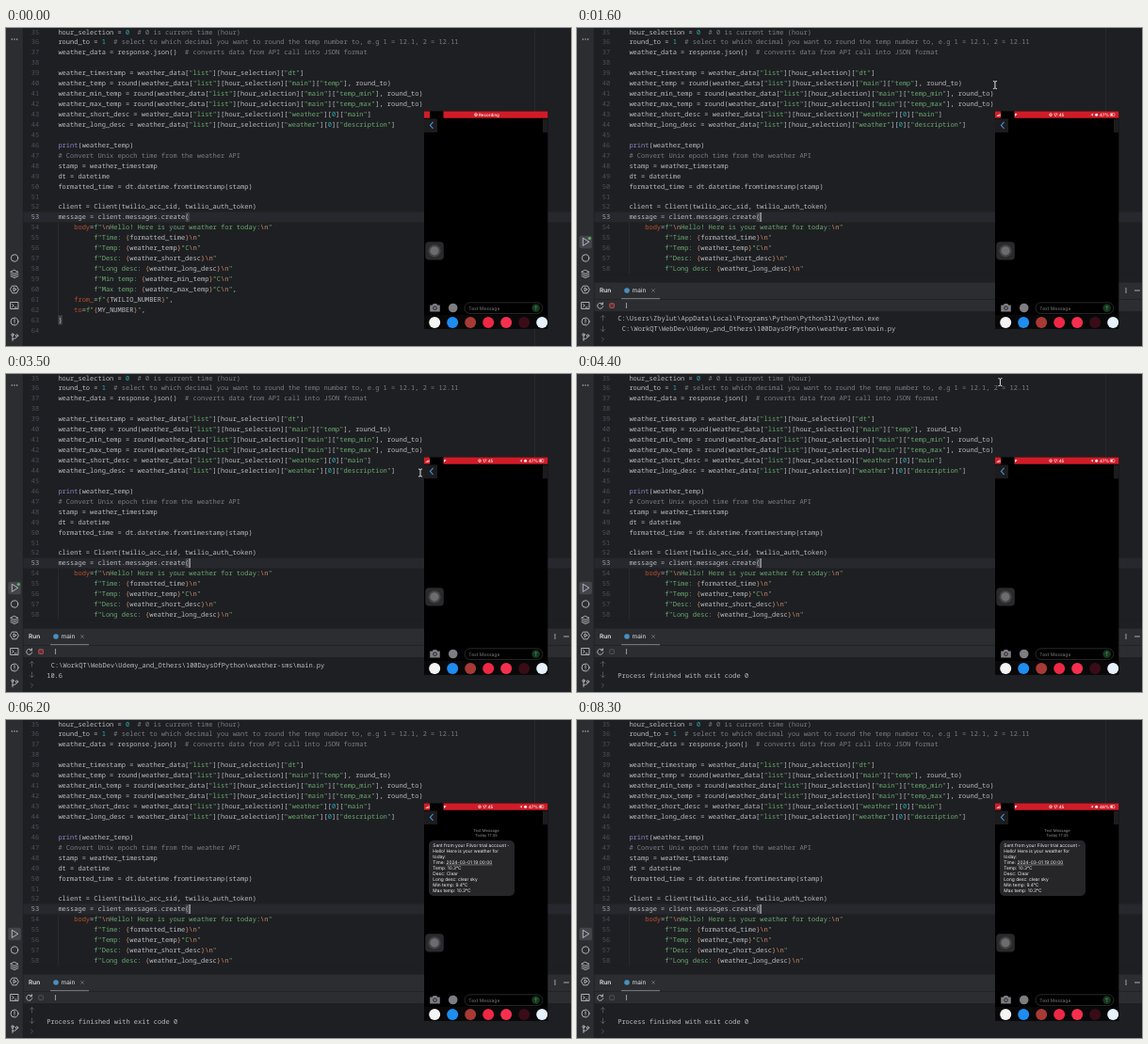
Write an HTML page that moves like this. It is 600 px wide and 338 px high and loops after 8400 ms.

```html
<!DOCTYPE html>
<html lang="en">
<head>
<meta charset="utf-8">
<title>Weather SMS</title>
<style>
  html, body { margin: 0; width: 100%; height: 100%; overflow: hidden; background: #1e1f22; }
  svg { display: block; width: 100%; height: 100%; }
  text { white-space: pre; text-rendering: geometricPrecision; }
  .mono { font: 7.03px "Noto Sans Mono", "DejaVu Sans Mono", monospace; fill: #bcbec4; }
  .ui { font: 6.5px Inter, sans-serif; fill: #dfe1e5; }
  .number { fill: #4b5059; }
  .number.current { fill: #a1a3ab; }
  .comment { fill: #7a7e85; }
  .string { fill: #6aab73; }
  .escape { fill: #cf8e6d; }
  .plain { fill: #bcbec4; }
  .builtin { fill: #8888c6; }
  .argument { fill: #b9532f; }
  .digit { fill: #2aacb8; }
  .icon { fill: none; stroke: #ced0d6; stroke-width: .8; stroke-linejoin: round; stroke-linecap: round; }
  .phone { font: 4.85px Inter, sans-serif; fill: #f2f2f4; }
  .stamp { font-size: 4.2px; fill: #8e8e93; text-anchor: middle; }
  .status { font-size: 4.5px; font-weight: 500; fill: #fff; }
</style>
</head>
<body>
<svg viewBox="0 0 600 338" preserveAspectRatio="none">
  <rect width="600" height="338" fill="#1e1f22"/>
  <rect x="18" y="195.6" width="582" height="10.9" fill="#26282e"/>
  <path d="M561.5 0V338M55.5 207V305" stroke="#2d2f33" stroke-width=".7"/>
  <g fill="#43454a">
    <rect x="190.6" y="196" width="4.3" height="10"/>
    <rect x="55.4" y="305.4" width="4.3" height="10"/>
  </g>
  <g id="editor" class="mono"></g>
  <rect data-span="500,8400" x="194.6" y="196" width="1" height="10" fill="#ced0d6"/>

  <!-- run panel -->
  <g data-span="1500,8400">
    <rect x="18" y="261.5" width="582" height="77" fill="#1e1f22"/>
    <rect x="18" y="270.5" width="582" height="31" fill="#2b2d30"/>
    <path d="M18 288.5H600M18 301.5H600M37.5 302V338" stroke="#1e1f22" stroke-width=".7"/>
    <text class="ui" x="24" y="281.2" style="font-weight:600">Run</text>
    <circle cx="53" cy="279" r="2.8" fill="#4a8fbd"/>
    <text class="ui" x="58.5" y="281.2">main</text>
    <path d="M47 287.6H88" stroke="#6f737a" stroke-width="1.2"/>
    <g class="icon">
      <path d="M79.5 277.5l3 3m0-3l-3 3" stroke="#868a91" stroke-width=".6"/>
      <path d="M27 293.3a3 3 0 1 0 .7 2.5M27.5 291.8v2h-2"/>
      <path d="M592.5 279h5"/>
      <path d="M27.5 311v-5.5m-2 2l2-2l2 2M27.5 317v5.5m-2-2l2 2l2-2M26.5 329l2 2l-2 2" stroke="#6f737a" stroke-width=".6"/>
    </g>
    <g fill="#ced0d6" id="menuDots"></g>
    <rect data-span="0,3900" x="34.8" y="292.8" width="4.6" height="4.6" rx=".6" fill="#5e3036" stroke="#db5c5c" stroke-width=".8"/>
    <rect data-span="3900,8400" x="34.8" y="292.8" width="4.6" height="4.6" rx=".6" fill="none" stroke="#5a5d63" stroke-width=".8"/>
    <g class="mono">
      <g data-span="1500,2500">
        <text x="43.2" y="310.5">C:\Users\Zbylut\AppData\Local\Programs\Python\Python312\python.exe</text>
        <text x="43.6" y="321.6"> C:\WorkQT\WebDev\Udemy_and_Others\100DaysOfPython\weather-sms\main.py</text>
      </g>
      <g data-span="2500,3900">
        <text x="43.6" y="312.3"> C:\WorkQT\WebDev\Udemy_and_Others\100DaysOfPython\weather-sms\main.py</text>
        <text x="43.2" y="323.3">10.6</text>
      </g>
      <text data-span="3900,8400" x="43.2" y="323.3">Process finished with exit code 0</text>
    </g>
  </g>

  <!-- tool window bar -->
  <rect width="18" height="338" fill="#2b2d30"/>
  <path d="M18.2 0V338" stroke="#1e1f22" stroke-width=".6"/>
  <g data-span="1500,8400">
    <rect x="2.3" y="220.7" width="13.6" height="13.6" rx="2" fill="#43454a"/>
    <path class="icon" d="M6.3 223.6v7.8l6.2-3.9z"/>
    <circle data-span="1500,3900" cx="13.3" cy="223.6" r="1.7" fill="#5fad65"/>
  </g>
  <g class="icon">
    <circle cx="9" cy="244.5" r="3.7"/>
    <path d="M9 257.4l4 2l-4 2l-4-2zM5 261.5l4 2l4-2M5 263.6l4 2l4-2"/>
    <path d="M6.8 274.2h4.4l2.2 3.8l-2.2 3.8h-4.4l-2.2-3.8zM8 276.3v3.4l2.8-1.7z"/>
    <path d="M5 291.5h8v7h-8zM6.6 293.5l1.6 1.5l-1.6 1.5M9.2 297h2"/>
    <circle cx="9" cy="312" r="4"/><path d="M9 309.6v2.8M9 314v.1"/>
    <circle cx="7" cy="326" r="1.2"/><circle cx="11.5" cy="327" r="1.2"/>
    <path d="M7 327.3v5.2M11.5 328.3q0 2-4.5 2.2"/>
  </g>

  <!-- phone -->
  <rect x="444" y="88.5" width="131.3" height="231" fill="#000"/>
  <rect x="444" y="96.5" width="14" height="14.5" fill="#1c1c1e"/>
  <rect x="570" y="96.5" width="5.3" height="14.5" fill="#1c1c1e"/>
  <path d="M453.6 99.8l-3.2 3.6l3.2 3.6" fill="none" stroke="#4a90d9" stroke-width="1.1"/>
  <path d="M444 88.5h6v7.2h-6zM464.5 88.5h110.8v7.2h-110.8z" fill="#d01c28"/>
  <g class="phone">
    <g data-span="0,500">
      <circle cx="499" cy="92.2" r="1.5" fill="none" stroke="#fff" stroke-width=".6"/><circle cx="499" cy="92.2" r=".7"/>
      <text class="status" x="502" y="93.8">Recording</text>
    </g>
    <g data-span="500,8400">
      <path d="M446.3 94v-1.2M447.7 94v-2M449.1 94v-2.8" stroke="#fff" stroke-width=".8"/>
      <path d="M465 91q1.6-.2 2.6.6l-2.6 2.4z"/>
      <circle cx="503" cy="92.2" r="1.4" fill="none" stroke="#fff" stroke-width=".6"/><circle cx="503" cy="92.2" r=".6"/>
      <text class="status" x="506" y="93.8">17:45</text>
      <path d="M545.4 92.3l3-1.5l-1.2 3.2l-.4-1.5z"/>
      <circle cx="551.6" cy="92.2" r="1.5"/>
      <text class="status" id="battery" x="555" y="93.8"></text>
      <rect x="566.3" y="90.7" width="4.6" height="2.9" rx=".7" fill="none" stroke="#fff" stroke-width=".5"/>
      <rect x="566.8" y="91.2" width="2" height="1.9"/>
    </g>
    <g data-span="4600,8400">
      <text class="stamp" x="510" y="119">Text Message</text>
      <text class="stamp" x="510" y="123.9">Today 17:45</text>
      <rect x="449" y="128" width="91" height="59" rx="5" fill="#262629"/>
      <g id="sms"></g>
      <path d="M467.3 153.9H516.5" stroke="#f2f2f4" stroke-width=".35"/>
    </g>
    <rect x="445.3" y="227.2" width="19.5" height="19.2" rx="4" fill="#2a2a2c"/>
    <circle cx="455" cy="236.8" r="6.6" fill="#444447"/>
    <circle cx="455" cy="236.8" r="4.6" fill="#6c6c6f"/>
    <path d="M450.2 294.4h2.6l1-1.5h3.4l1 1.5h2.6v7h-10.6z" fill="#7d7d82"/>
    <circle cx="455.5" cy="297.7" r="1.8" fill="#7d7d82" stroke="#000" stroke-width=".7"/>
    <circle cx="474.7" cy="297.5" r="4.8" fill="#7d7d82"/>
    <rect x="487" y="291.8" width="82.8" height="11.8" rx="5.9" fill="#000" stroke="#343437" stroke-width=".8"/>
    <text x="491.3" y="299.5" style="font-size:5px;fill:#77777c">Text Message</text>
    <circle cx="562.7" cy="297.6" r="4.3" fill="#12391c"/>
    <path d="M562.7 300v-4.6m-1.7 1.7l1.7-1.7l1.7 1.7" fill="none" stroke="#5d7d65" stroke-width=".7"/>
    <rect x="444" y="305" width="131.3" height="14.5" fill="#080809"/>
    <svg x="444" y="305" width="131.3" height="14.5" id="apps"></svg>
  </g>

  <g id="cursor">
    <path d="M-2-4q2 0 2 1q0-1 2-1M0-3V3M-2 4q2 0 2-1q0 1 2 1" fill="none" stroke="#f4f4f4" stroke-width=".9"/>
  </g>
</svg>
<script>
const LOOP = 8400;
const FIRST_LINE = 35, CURRENT_LINE = 53, LINE_HEIGHT = 10.94;
const byId = id => document.getElementById(id);

const code = String.raw`hour_selection = 0  # 0 is current time (hour)
round_to = 1  # select to which decimal you want to round the temp number to, e.g 1 = 12.1, 2 = 12.11
weather_data = response.json()  # converts data from API call into JSON format

weather_timestamp = weather_data["list"][hour_selection]["dt"]
weather_temp = round(weather_data["list"][hour_selection]["main"]["temp"], round_to)
weather_min_temp = round(weather_data["list"][hour_selection]["main"]["temp_min"], round_to)
weather_max_temp = round(weather_data["list"][hour_selection]["main"]["temp_max"], round_to)
weather_short_desc = weather_data["list"][hour_selection]["weather"][0]["main"]
weather_long_desc = weather_data["list"][hour_selection]["weather"][0]["description"]

print(weather_temp)
# Convert Unix epoch time from the weather API
stamp = weather_timestamp
dt = datetime
formatted_time = dt.datetime.fromtimestamp(stamp)

client = Client(twilio_acc_sid, twilio_auth_token)
message = client.messages.create(
    body=f"\nHello! Here is your weather for today:\n"
         f"Time: {formatted_time}\n"
         f"Temp: {weather_temp}°C\n"
         f"Desc: {weather_short_desc}\n"
         f"Long desc: {weather_long_desc}\n"
         f"Min temp: {weather_min_temp}°C\n"
         f"Max temp: {weather_max_temp}°C\n",
    from_=f"{TWILIO_NUMBER}",
    to=f"{MY_NUMBER}",
)
`;

const sms = `Sent from your Filvor trial account -
Hello! Here is your weather for
today:
Time: 2024-03-01 19:00:00
Temp: 10.3°C
Desc: Clear
Long desc: clear sky
Min temp: 9.4°C
Max temp: 10.3°C`;

const span = (kind, s) => `<tspan class="${kind}">${s}</tspan>`;

const colourString = s => span('string', s.replace(/\\n|\{(\w+)\}/g, (match, name) =>
  name ? span('escape', '{') + span('plain', name) + span('escape', '}') : span('escape', match)));

const TOKENS = /(#.*)|(f?"[^"]*")|\b(print)(?=\()|\b(body|from_|to)(?==)|\b(\d+)\b/g;
const highlight = line => line.replace(TOKENS, (match, comment, string, builtin, argument) =>
  string ? colourString(string)
    : span(comment ? 'comment' : builtin ? 'builtin' : argument ? 'argument' : 'digit', match));

byId('editor').innerHTML = code.split('\n').map((line, i) => {
  const number = FIRST_LINE + i, y = 6.5 + i * LINE_HEIGHT;
  const current = number === CURRENT_LINE ? ' current' : '';
  return `<text class="number${current}" x="26.7" y="${y}">${number}</text>
    <text x="55.4" y="${y}">${highlight(line)}</text>`;
}).join('');

byId('sms').innerHTML = sms.split('\n').map((line, i) =>
  `<text x="453.3" y="${135.4 + i * 5.97}">${line}</text>`).join('');

byId('apps').innerHTML = ['#f4f4f4', '#1f8cf0', '#a83a35', '#ee2844', '#f5304e', '#3a0c18', '#e6f1fc']
  .map((fill, i) => `<circle cx="${11.2 + i * 19}" cy="8" r="6" fill="${fill}"/>`).join('');

const dots = (x, y, dx, dy) => [-1, 0, 1].map(k =>
  `<circle cx="${x + k * dx}" cy="${y + k * dy}" r=".65"/>`).join('');
byId('menuDots').innerHTML = dots(52.5, 295, 0, 2) + dots(583, 279, 0, 2);
byId('cursor').insertAdjacentHTML('beforebegin', `<g fill="#ced0d6">${dots(9, 12, 2.7, 0)}</g>`);

// [time, x, y]
const cursorPath = [[0, 450, -8], [1400, 450, -8], [1750, 440, 105], [4100, 440, 105],
  [4450, 450, 3], [5200, 450, 3], [5400, 452, -8], [LOOP, 452, -8]];

function cursorAt(t) {
  const i = cursorPath.findIndex(p => p[0] > t);
  const [t0, x0, y0] = cursorPath[i - 1], [t1, x1, y1] = cursorPath[i];
  const k = (t - t0) / (t1 - t0), ease = k * k * (3 - 2 * k);
  return [x0 + (x1 - x0) * ease, y0 + (y1 - y0) * ease];
}

const timed = [...document.querySelectorAll('[data-span]')].map(element => {
  const [start, end] = element.dataset.span.split(',').map(Number);
  return { element, start, end };
});

function draw(now) {
  const t = Math.floor(now % LOOP / 100) * 100;
  for (const { element, start, end } of timed)
    element.style.display = t >= start && t < end ? '' : 'none';
  byId('battery').textContent = t < 7300 ? '47%' : '46%';
  byId('cursor').setAttribute('transform', `translate(${cursorAt(t)})`);
}

const began = performance.now();
function tick() {
  draw(performance.now() - began);
  requestAnimationFrame(tick);
}
tick();
</script>
</body>
</html>
```
